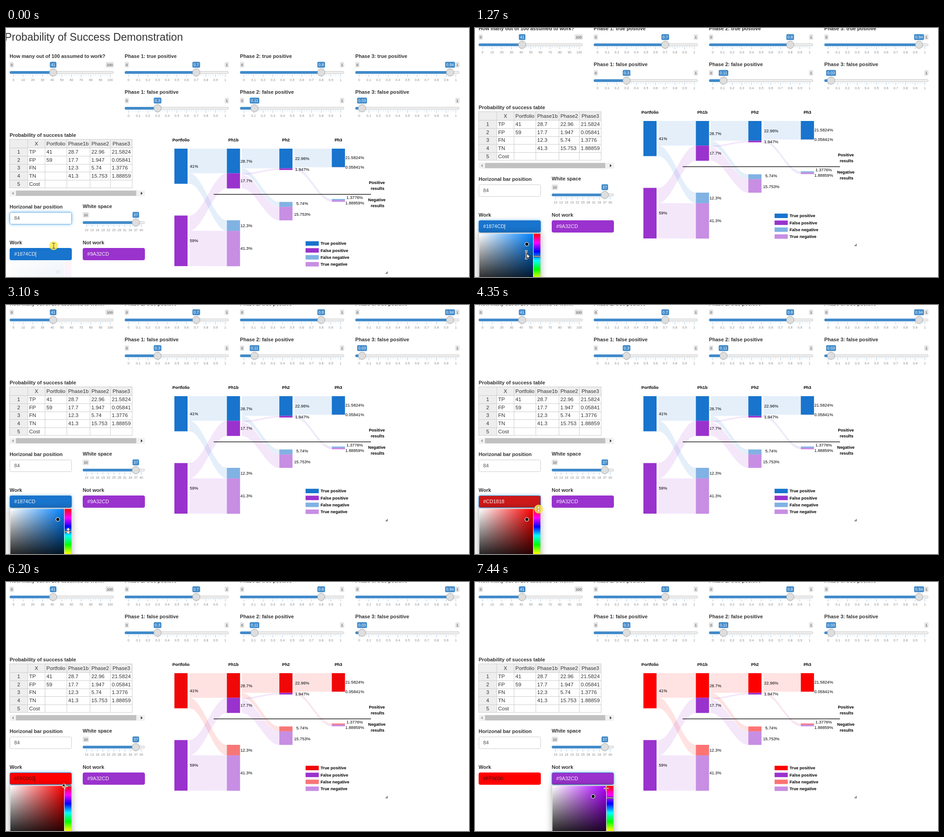
Write an HTML page with a canvas that moves like this. It is 1020x549 px and loops after 8 s.

```html
<!DOCTYPE html>
<html lang="en">
<head>
<meta charset="utf-8">
<title>Probability of Success Demonstration</title>
<style>
html, body { margin: 0; width: 100%; height: 100%; overflow: hidden; background: #fff; }
canvas { display: block; }
</style>
</head>
<body>
<canvas id="stage" width="1020" height="549"></canvas>
<script>
const c = document.getElementById('stage').getContext('2d');
const LOOP = 8000, BLUE = '#1874CD', PURPLE = '#9A32CD', RED = '#FF0000';
const FONT = '"Liberation Sans", Arial, sans-serif';

// Each step holds until the next one; pointer = [kind, x, y, highlight colour].
const base = { at: 0, scroll: 65, work: BLUE, chart: BLUE, focus: 'work', picker: 'work', caret: false };
const steps = [
  { scroll: 0, focus: 'bar', picker: 'fading', caret: true, pointer: ['beam', 105, 480, '#fbe94a'] },
  { at: 610, scroll: 0, pointer: ['arrow', 106, 485] },
  { at: 1270, scroll: 61, caret: true, pointer: ['busy', 113, 500] },
  { at: 1860, pointer: ['cross', 117, 466] },
  { at: 2490, caret: true, pointer: ['cross', 121, 472] },
  { at: 3100, pointer: ['updown', 137, 498] },
  { at: 3730, pointer: ['updown', 140, 499, '#fbe94a'] },
  { at: 4350, work: '#CD1818', pointer: ['updown', 140, 450, '#fbe94a'] },
  { at: 4980, work: '#CD1818', caret: true, pointer: ['cross', 117, 472] },
  { at: 5600, work: '#F00808', caret: true, pointer: ['cross', 125, 457, '#f9a01b'] },
  { at: 6200, work: RED, chart: '#F00808', caret: true, pointer: ['cross', 130, 451] },
  { at: 6830, work: RED, chart: RED, pointer: ['tinybeam', 246, 420] },
  { at: 7440, work: RED, chart: RED, focus: 'not', picker: 'not', pointer: ['cross', 289, 455] }
].map(s => ({ ...base, ...s }));

// y is the middle of the capital letters
function text(s, x, y, size = 11.07, o = {}) {
  c.font = `${o.bold ? 'bold ' : ''}${size}px ${FONT}`;
  c.textAlign = o.align || 'left';
  c.fillStyle = o.color || '#333';
  c.fillText(s, x, y + size * 0.36);
  return c.measureText(s).width;
}
const bold = (s, x, y) => text(s, x, y, 11.07, { bold: true });

function rect(x, y, w, h, color) {
  c.fillStyle = color;
  c.fillRect(x, y, w, h);
}

function round(x, y, w, h, r, fill) {
  c.beginPath();
  c.roundRect(x, y, w, h, r);
  c.fillStyle = fill;
  c.fill();
}

function line(color, width = 1) {
  c.strokeStyle = color;
  c.lineWidth = width;
  c.stroke();
}

function path(points, close) {
  c.beginPath();
  points.forEach(([x, y]) => c.lineTo(x, y));
  if (close) c.closePath();
}

function shape(points, x, y, fill) {
  path(points.map(([dx, dy]) => [x + dx, y + dy]), true);
  c.fillStyle = fill;
  c.fill();
}

function circle(x, y, r, fill) {
  c.beginPath();
  c.arc(x, y, r, 0, 7);
  c.fillStyle = fill;
  c.fill();
}

function alpha(color, a) {
  return color + Math.round(a * 255).toString(16).padStart(2, '0');
}

// ---- sliders ----
function badgeWidth(s, size) {
  c.font = `${size}px ${FONT}`;
  return c.measureText(s).width + 4.8;
}

function badge(s, left, y, w, h, size, fill, color) {
  round(left, y - h / 2, w, h, 2.5, fill);
  text(s, left + w / 2, y, size, { align: 'center', color });
}

function slider(label, x, y, value, min = 0, max = 1, w = 229.5) {
  const x0 = x + 8.5, span = w - 16.5, mid = y + 35.5, by = y + 18.5;
  const pos = x0 + span * (value - min) / (max - min);
  bold(label, x, y);

  // a limit is hidden where the value badge covers it
  const vw = badgeWidth(value, 8.7), left = pos - vw / 2;
  const minW = badgeWidth(min, 7.9), maxW = badgeWidth(max, 7.9);
  const limit = (s, lx, lw) => badge(s, lx, by, lw, 12, 7.9, '#e3e3e3', '#444');
  if (left > x + minW) limit(min, x, minW);
  if (left + vw < x + w - maxW) limit(max, x + w - maxW, maxW);
  badge(value, left, by, vw, 13, 8.7, '#428bca', '#fff');

  round(x + .5, mid - 2.5, w - 1, 5, 2.5, '#eee');
  line('#ccc');
  round(x, mid - 3, pos - x, 6, 3, '#428bca');
  for (let i = 0; i <= 40; i++) {
    const major = i % 4 === 0, tx = x0 + span * i / 40;
    rect(tx - .4, mid + 4, .8, major ? 6 : 3, major ? '#8fbde2' : '#b9d5ec');
    if (major) {
      const v = +(min + (max - min) * i / 40).toFixed(1);
      text(v, tx, y + 52, 7.2, { align: 'center', color: '#888' });
    }
  }
  circle(pos, mid, 8.2, '#dedede');
  line('#a5a5a5');
}

function sliders() {
  slider('How many out of 100 assumed to work?', 8, 62.5, 41, 0, 100);
  [[.7, .3], [.8, .11], [.94, .03]].forEach(([tp, fp], i) => {
    const x = 261.5 + 254 * i;
    slider(`Phase ${i + 1}: true positive`, x, 62.5, tp);
    slider(`Phase ${i + 1}: false positive`, x, 141.5, fp);
  });
  slider('White space', 169, 393.5, 37, 10, 40, 137);
}

// ---- table ----
const heads = ['', 'X', 'Portfolio', 'Phase1b', 'Phase2', 'Phase3'];
const rows = [
  ['TP', 41, 28.7, 22.96, 21.5824],
  ['FP', 59, 17.7, 1.947, 0.05841],
  ['FN', '', 12.3, 5.74, 1.3776],
  ['TN', '', 41.3, 15.753, 1.88859],
  ['Cost', '', '', '', '']
];
const edges = [8, 48, 86, 134, 185, 230, 278];

function table() {
  bold('Probability of success table', 8, 236);
  rect(8, 245, 270, 19, '#eee');
  rect(8, 245, 40, 108, '#eee');
  heads.forEach((h, i) => text(h, (edges[i] + edges[i + 1]) / 2, 254.5, 11.4, { align: 'center' }));
  rows.forEach((r, j) => {
    const y = 273 + 17.65 * j;
    text(j + 1, 28, y, 11.4, { align: 'center' });
    r.forEach((v, i) => text(v, edges[i + 1] + 3, y, 11.6));
  });
  edges.forEach(x => rect(x - .5, 245, 1, 108, '#ccc'));
  [245, 264, 282, 300, 317, 335, 352].forEach(y => rect(8, y, 270, 1, '#ccc'));
  rect(8, 358, 298, 13, '#f1f1f1');
  rect(22, 358.5, 265, 11.5, '#c1c1c1');
  [[17, -4, '#a3a3a3'], [297, 4, '#404040']]
    .forEach(([x, d, color]) => shape([[0, -3.5], [d, 0], [0, 3.5]], x, 364.5, color));
}

// ---- flow chart ----
const K = 1.89, TOP = 266, BAR = 29;
const lows = [413.5, 424, 383.5, 377];
const stages = lows.map((low, i) => {
  const [tp, fp, fn, tn] = rows.slice(0, 4).map(r => r[i + 1] * K);
  return {
    x: 371 + 115.6 * i, h: [tp, fp, fn, tn],
    y: [TOP, i ? TOP + tp : low, low, low + fn]
  };
});

// ribbon whose edges follow half a cosine wave
function flow(x1, y1, x2, y2, h, color) {
  const bend = (x2 - x1) * .3642, a = x1 + bend, b = x2 - bend;
  c.beginPath();
  c.moveTo(x1, y1);
  c.bezierCurveTo(a, y1, b, y2, x2, y2);
  c.lineTo(x2, y2 + h);
  c.bezierCurveTo(b, y2 + h, a, y1 + h, x1, y1 + h);
  c.fillStyle = color;
  c.fill();
}

const notes = [
  ['41', 405, 305], ['59', 405, 469], ['28.7', 516.5, 293.5], ['17.7', 516.5, 337], ['12.3', 516.5, 435.5],
  ['41.3', 516.5, 486], ['22.96', 637, 288], ['1.947', 637, 311.5], ['5.74', 639.5, 387],
  ['15.753', 634.5, 411], ['21.5824', 747.5, 286], ['0.05841', 747.5, 307],
  ['1.3776', 750, 374], ['1.88859', 747.5, 385.5]
];

function chart(color) {
  const fills = [color, PURPLE, alpha(color, .55), alpha(PURPLE, .55)];
  stages.forEach((s, i) => {
    const next = stages[i + 1];
    if (!next) return;
    // true positives split into 0 and 2, false positives into 1 and 3
    [0, 1].forEach(k => {
      let y = s.y[k];
      [k, k + 2].forEach(to => {
        flow(s.x + 33, y, next.x, next.y[to], next.h[to], alpha(fills[k], .115));
        y += next.h[to];
      });
    });
  });
  stages.forEach(s => s.h.forEach((h, k) => rect(s.x, s.y[k], BAR, h, fills[k])));
  const black = { color: '#000' }, strong = { color: '#000', bold: true };
  const center = { ...strong, align: 'center' };
  notes.forEach(([v, x, y]) => text(v + '%', x, y, 9.2, black));
  ['Portfolio', 'Ph1b', 'Ph2', 'Ph3'].forEach((s, i) => text(s, 385.5 + 115.6 * i, 247, 9.2, center));
  rect(457.5, 366, 346.5, 1.4, '#111');
  [['Positive', 341], ['results', 354], ['Negative', 379], ['results', 392]]
    .forEach(([s, y]) => text(s, s === 'results' ? 818.5 : 817, y, 9.2, center));
  ['True positive', 'False positive', 'False negative', 'True negative'].forEach((s, i) => {
    const y = 475 + 15.25 * i;
    rect(660, y - 4.8, 29, 9.8, fills[i]);
    text(s, 693, y, 9.2, strong);
  });
  shape([[0, -6], [0, 0], [-6, 0]], 841, 542, '#888');
}

// ---- inputs and colour picker ----
function field(x, y, s, fill, color, focus, caret) {
  const plain = fill === '#fff';
  c.save();
  if (focus) {
    c.shadowColor = 'rgba(60,160,235,.75)';
    c.shadowBlur = 7;
  }
  round(x + .5, y + .5, 136, 26, 3, fill);
  c.restore();
  if (plain) line(focus ? '#66afe9' : '#ccc');
  else line(focus ? '#3f7fc4' : fill);
  const w = text(s, x + 10, y + 13.5, 11.07, { color });
  if (caret) rect(x + 10.5 + w, y + 8, 1, 12, color);
}

function hsv(hex) {
  const [r, g, b] = [1, 3, 5].map(i => parseInt(hex.slice(i, i + 2), 16) / 255);
  const v = Math.max(r, g, b), d = v - Math.min(r, g, b);
  const h = v === r ? (g - b) / d : v === g ? 2 + (b - r) / d : 4 + (r - g) / d;
  return [(h * 60 + 360) % 360, d / v, v];
}

function gradient(x0, y0, x1, y1, colors) {
  const g = c.createLinearGradient(x0, y0, x1, y1);
  colors.forEach((col, i) => g.addColorStop(i / (colors.length - 1), col));
  return g;
}

function picker(x, y, hex) {
  const [h, s, v] = hsv(hex), size = 118.5, gx = x + 1.5, gy = y + 1.5, hx = x + 121;
  c.save();
  c.shadowColor = 'rgba(0,0,0,.3)';
  c.shadowBlur = 14;
  rect(x, y, 137, 122, '#fff');
  c.restore();
  c.strokeStyle = '#ccc';
  c.lineWidth = 1;
  c.strokeRect(x + .5, y + .5, 136, 121);
  rect(gx, gy, size, size, gradient(gx, 0, gx + size, 0, ['#fff', `hsl(${h} 100% 50%)`]));
  rect(gx, gy, size, size, gradient(0, gy, 0, gy + size, ['rgba(0,0,0,0)', '#000']));
  rect(hx, gy, 15, size, gradient(0, gy, 0, gy + size,
    ['#f00', '#f0f', '#00f', '#0ff', '#0f0', '#ff0', '#f00']));
  const hy = gy + size * (h ? 1 - h / 360 : 0);
  rect(hx, hy - 1.5, 15, 3.5, '#000');
  rect(hx, hy - .5, 15, 1.5, '#fff');
  circle(gx + size * s, gy + size * (1 - v), 4, '#000');
  line('#fff', 1.2);
}

function inputs(s) {
  bold('Horizonal bar position', 8, 394);
  field(8, 406, '84', '#fff', '#555', s.focus === 'bar');
  bold('Work', 8, 473);
  field(8, 485, s.work, s.work, s.work === RED ? '#4a0d0d' : '#f4f4f4', s.focus === 'work', s.caret);
  bold('Not work', 169, 473);
  field(169, 485, PURPLE, PURPLE, '#f4f4f4', s.focus === 'not');
  if (s.picker === 'not') picker(169, 513, PURPLE);
  else {
    c.globalAlpha = s.picker === 'fading' ? .04 : 1;
    picker(8, 513, s.work);
    c.globalAlpha = 1;
  }
}

// ---- pointer ----
function beam(x, y, h, color, width) {
  path([[x, y - h], [x, y + h]]);
  line(color, width);
  [-h, h].forEach(d => {
    path([[x - 3, y + d], [x + 3, y + d]]);
    line(color, width);
  });
}

function arrow(x, y) {
  shape([[0, 0], [0, 11], [2.6, 8.6], [4.4, 12.6], [6, 11.9], [4.3, 8], [7.8, 8]], x, y, '#fff');
  line('#111');
}

function pointer([kind, x, y, glow]) {
  if (glow) circle(x, y, 9.7, glow + 'd8');
  if (kind === 'beam') beam(x, y, 5.5, '#444');
  if (kind === 'tinybeam') beam(x, y, 3, '#a33');
  if (kind === 'arrow') arrow(x, y);
  if (kind === 'busy') {
    beam(x, y, 8.5, '#fff', 3);
    beam(x, y, 8.5, '#333');
    arrow(x + 1, y - 3);
  }
  if (kind === 'cross') {
    [['#fff', 2.4], ['#a2571e', 1]].forEach(([color, w]) => {
      path([[x - 6, y], [x + 6, y]]);
      line(color, w);
      path([[x, y - 6], [x, y + 6]]);
      line(color, w);
    });
  }
  if (kind === 'updown') {
    shape([[0, -7], [4, -2], [1, -2], [1, 2], [4, 2], [0, 7], [-4, 2], [-1, 2], [-1, -2], [-4, -2]], x, y, '#fff');
    line('#c77a20', .9);
  }
}

function draw(s) {
  rect(0, 0, 1020, 549, '#fff');
  c.save();
  c.translate(0, -s.scroll);
  text('Probability of Success Demonstration', -3, 19, 23.65);
  sliders();
  table();
  chart(s.chart);
  inputs(s);
  c.restore();
  pointer(s.pointer);
}

const start = performance.now();
let shown;
function tick() {
  const t = (performance.now() - start) % LOOP;
  const step = steps.findLast(s => s.at <= t);
  if (step !== shown) draw(shown = step);
  requestAnimationFrame(tick);
}
tick();
</script>
</body>
</html>
```
